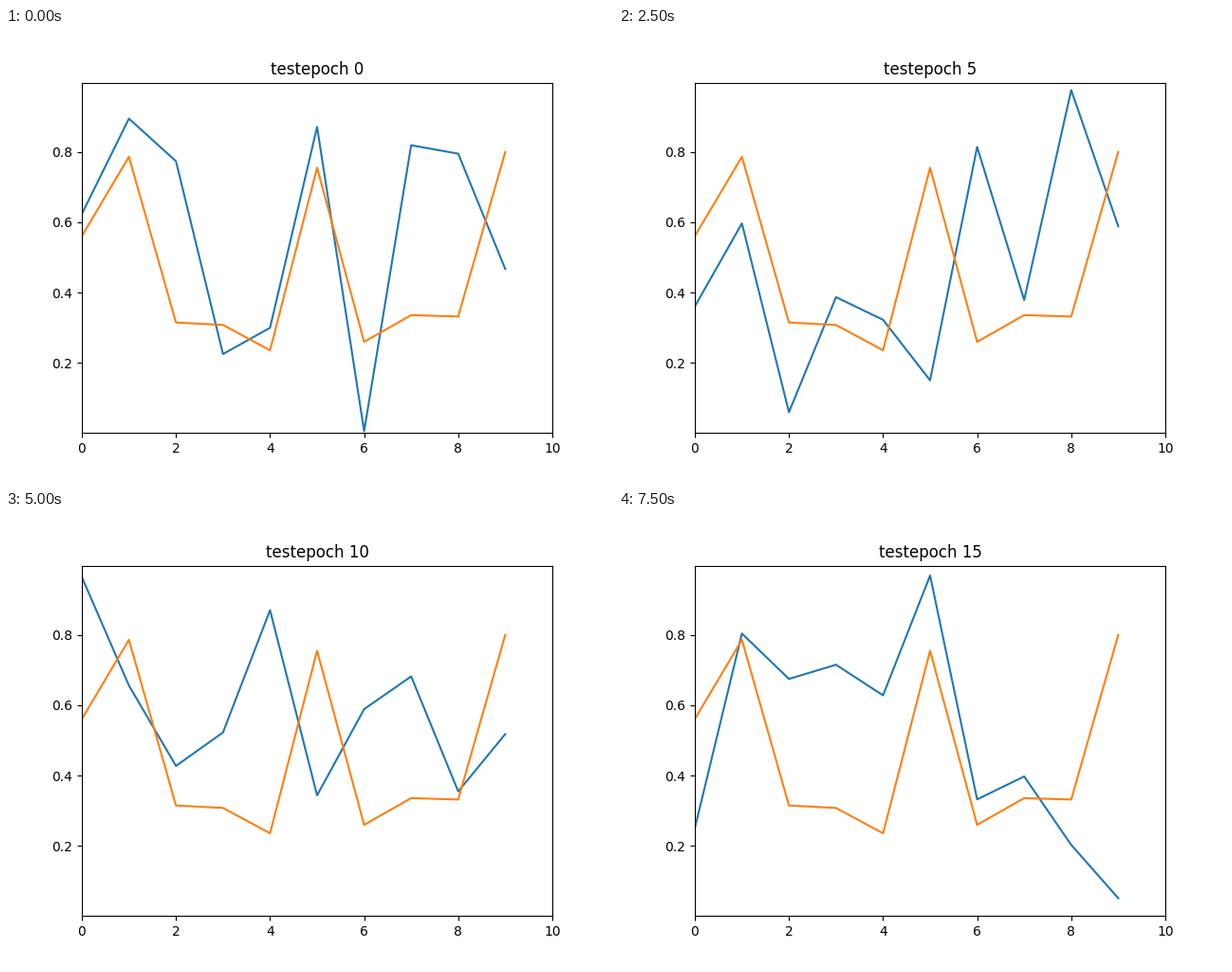
A matplotlib script for the animation above (8000 ms loop, 640 by 480 pixels).

```python
import numpy as np
import matplotlib.pyplot as plt
from matplotlib.animation import FuncAnimation

EPOCHS = 16
STEP_MS = 500
LOW, HIGH = .001, .997

X = np.arange(10)
TARGET = [.561, .786, .315, .308, .236, .755, .26, .336, .332, .8]

# Each epoch shows a fresh uniform sample; the seed keeps loops identical.
outputs = np.random.default_rng(7).uniform(LOW, HIGH, (EPOCHS, len(X)))

fig, ax = plt.subplots(figsize=(6.4, 4.8), dpi=100)
ax.set_xlim(0, 10)
ax.set_ylim(LOW, HIGH)
ax.set_yticks(np.arange(.2, .9, .2))
out_line, = ax.plot(X, outputs[0], color="C0")
ax.plot(X, TARGET, color="C1")
title = ax.set_title("testepoch 0")


def update(epoch):
    out_line.set_ydata(outputs[epoch])
    title.set_text(f"testepoch {epoch}")
    return out_line, title


anim = FuncAnimation(fig, update, frames=EPOCHS, interval=STEP_MS,
                     repeat=True, repeat_delay=0)
plt.show()
```
